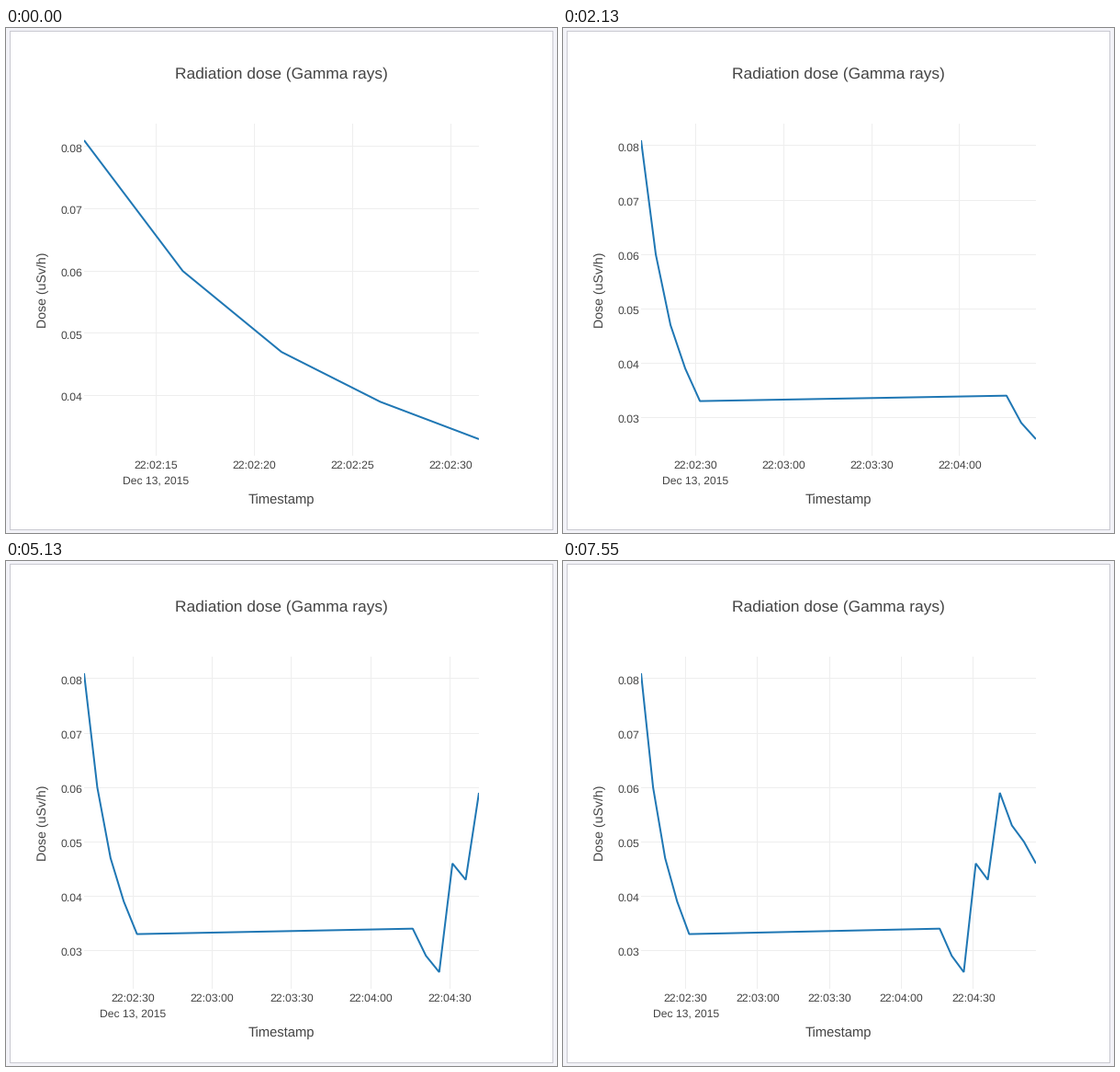
Recreate the animation shown at these times as a matplotlib script. Size 600 by 549 pixels, loop 8000 ms.

```python
import math
import matplotlib.pyplot as plt
from matplotlib.animation import FuncAnimation
from matplotlib.patches import Rectangle

WIDTH, HEIGHT, DPI = 600, 549, 100
LEFT, RIGHT, TOP, BOTTOM = 85, 515, 104, 465
INTERVAL, LOOP = 20, 8000
PX = 72 / DPI
TEXT = "#444444"

plt.rcParams["font.family"] = "Liberation Sans"
plt.rcParams["text.hinting"] = "none"

# Seconds after 22:02:00; the sensor pauses after the fifth reading.
STEP = 5.02
DOSES = [.081, .060, .047, .039, .033,
         .034, .029, .026, .046, .043, .059, .053, .050, .046]
TIMES = [11.35 + STEP * i if i < 5 else 135.98 + STEP * (i - 5)
         for i in range(len(DOSES))]
# Moments (ms) at which one more reading arrives.
ARRIVALS = [130, 1130, 2130, 3130, 4130, 5130, 6130, 6550, 7550]
FIRST_COUNT = 5

fig = plt.figure(figsize=(WIDTH / DPI, HEIGHT / DPI), dpi=DPI,
                 facecolor="#f3f3f8")
ax = fig.add_axes([0, 0, 1, 1])
ax.set_xlim(0, WIDTH)
ax.set_ylim(HEIGHT, 0)
ax.axis("off")


def box(x0, y0, x1, y1, color):
    return ax.add_patch(Rectangle((x0, y0), x1 - x0, y1 - y0, color=color,
                                  lw=0, snap=False, zorder=0))


def label(x, y, text, size, align="center", **kw):
    return ax.text(x, y, text, fontsize=size * PX, color=TEXT,
                   ha=align, va="baseline", **kw)


def line(xs, ys, color, width, zorder):
    return ax.plot(xs, ys, color=color, lw=width * PX, zorder=zorder,
                   snap=False, solid_capstyle="butt",
                   solid_joinstyle="bevel")[0]


def pixel_center(v):
    return math.floor(v) + 0.5


def clock(seconds):
    return f"22:{2 + seconds // 60:02d}:{seconds % 60:02d}"


def build_chart(count):
    """Draw the chart of the first `count` readings, hidden at first."""
    times, doses = TIMES[:count], DOSES[:count]
    span = times[-1] - times[0]
    high, low = max(doses), min(doses)
    pad = (BOTTOM - TOP) * 0.05

    def to_x(t):
        return LEFT + (t - times[0]) / span * (RIGHT - LEFT)

    def to_y(d):
        return TOP + pad + (high - d) / (high - low) * (BOTTOM - TOP - 2 * pad)

    parts = []
    tick = 5 if span < 60 else 30
    first = math.ceil(times[0] / tick) * tick
    for t in range(first, int(times[-1]) + 1, tick):
        x = to_x(t)
        parts.append(line([pixel_center(x)] * 2, [TOP, BOTTOM], "#eeeeee", 1, 1))
        parts.append(label(x, 479, clock(t), 12.2))
    parts.append(label(to_x(first), 495, "Dec 13, 2015", 12.1))

    for n in range(10):
        y = to_y(n / 100)
        if TOP <= y <= BOTTOM:
            parts.append(line([LEFT, RIGHT], [pixel_center(y)] * 2,
                              "#eeeeee", 1, 1))
            parts.append(label(83.8, y + 5.8, f"{n / 100:.2f}", 12.2, "right"))

    curve = line([to_x(t) for t in times], [to_y(d) for d in doses],
                 "#1f77b4", 2, 2)
    curve.set_clip_path(plot_area)
    parts.append(curve)
    for part in parts:
        part.set_visible(False)
    return parts


box(4, 3, 596, 546, "#c9c9d1")
box(5, 4, 595, 545, "white")
plot_area = box(LEFT, TOP, RIGHT, BOTTOM, "white")
label(300, 54, "Radiation dose (Gamma rays)", 17.4)
label(300, 517, "Timestamp", 14.7)
label(47, 284.5, "Dose (uSv/h)", 14.1, "right", rotation=90).set(
    va="center", rotation_mode="default")

charts = [build_chart(FIRST_COUNT + i) for i in range(len(ARRIVALS) + 1)]


def update(frame):
    now = (frame + 0.5) * INTERVAL
    current = sum(now >= t for t in ARRIVALS)
    for i, chart in enumerate(charts):
        for part in chart:
            part.set_visible(i == current)
    return []


anim = FuncAnimation(fig, update, frames=LOOP // INTERVAL, interval=INTERVAL,
                     repeat=True, repeat_delay=0, blit=False)
plt.show()
```
